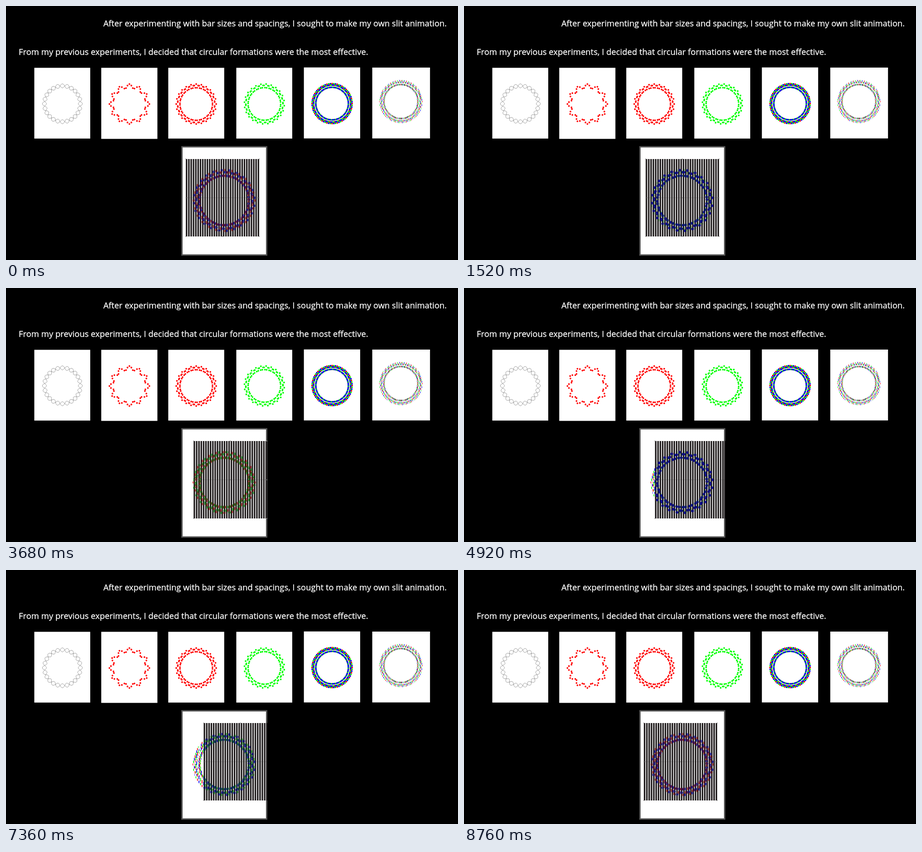
Animation, 998 px wide and 561 px high, one loop 8.8 s. Source, as an HTML page:

```html
<!DOCTYPE html>
<html lang="en">
<head>
<meta charset="utf-8">
<title>Slit animation</title>
<style>
  html, body { margin: 0; width: 100%; height: 100%; overflow: hidden; background: #000; }
  svg { display: block; width: 100vw; height: 100vh; }
  text { font-family: "Open Sans", "Noto Sans", sans-serif; fill: #fff; stroke: #fff; stroke-width: 0.3; }
</style>
</head>
<body>
<svg id="stage" viewBox="0 0 998 561">
  <text x="215" y="45.3" font-size="18.37">After experimenting with bar sizes and spacings, I sought to make my own slit animation.</text>
  <text x="28" y="107.5" font-size="18.44">From my previous experiments, I decided that circular formations were the most effective.</text>
</svg>
<script>
const NS = 'http://www.w3.org/2000/svg';
const stage = document.getElementById('stage');

function add(parent, tag, attrs) {
  const el = document.createElementNS(NS, tag);
  for (const key in attrs) el.setAttribute(key, attrs[key]);
  return parent.appendChild(el);
}

const rect = (parent, x, y, width, height, fill) =>
  add(parent, 'rect', { x, y, width, height, fill });

const place = (x, y, scale = 1) =>
  add(stage, 'g', { transform: `translate(${x} ${y}) scale(${scale})` });

// Wavy ring: twelve lobes around a circle
const LOBES = 12, RADIUS = 39.6, SWING = 4.5, DOTS = 60;
const DEGREE = Math.PI / 180;

// A point of the wave after the whole ring is turned
function wavePoint(angle, turn) {
  const r = RADIUS + SWING * Math.cos(LOBES * angle);
  const a = angle + turn;
  return `${(r * Math.sin(a)).toFixed(2)} ${(-r * Math.cos(a)).toFixed(2)}`;
}

function wavePath(turn) {
  const points = [];
  for (let i = 0; i < 360; i++) points.push(wavePoint(i * DEGREE, turn));
  return `M${points.join('L')}Z`;
}

function dotPath(turn) {
  let d = '';
  for (let i = 0; i < DOTS; i++) d += `M${wavePoint(i * 2 * Math.PI / DOTS, turn)}h0`;
  return d;
}

const dots = (parent, d, stroke) => add(parent, 'path', {
  d, stroke, fill: 'none', 'stroke-width': 3.8, 'stroke-linecap': 'round'
});

const HALF_LOBE = Math.PI / LOBES;
const doubleRing = turn => dotPath(turn) + dotPath(turn + HALF_LOBE);

const RED = { color: '#f00', dim: '#801410', d: doubleRing(0) };
const GREEN = { color: '#0f0', dim: '#006c12', d: doubleRing(5 * DEGREE) };
const BLUE = { color: '#00f', dim: '#000092', d: doubleRing(10 * DEGREE) };
const inks = [BLUE, RED, GREEN];

// Slit geometry, in stage pixels on the large sheet
const GRID = { y: 338, width: 162, height: 171 };
const SLITS = 31;
const PITCH = GRID.width / (SLITS + 2 / 3), SLIT = PITCH / 3, BAR = PITCH - SLIT;
const RING = { x: 481.8, y: 429.5, scale: 1.52 };
const STRIP_X = 415;

const defs = add(stage, 'defs', {});
inks.forEach((ink, n) => {
  const clip = add(defs, 'clipPath', { id: `strip${n}` });
  const width = SLIT / RING.scale;
  let d = '';
  for (let k = -2; k < 30; k++) {
    const x = (STRIP_X + k * PITCH - RING.x) / RING.scale + n * width;
    d += `M${x.toFixed(3)} -50h${width}v100h${-width}z`;
  }
  add(clip, 'path', { d });
});

function slicedRing(parent) {
  inks.forEach((ink, n) => {
    const layer = add(parent, 'g', { 'clip-path': `url(#strip${n})` });
    dots(layer, ink.d, ink.color);
  });
}

// Row of six sheets
rect(stage, 62.5, 136.5, 123.5, 156.3, '#fff');
rect(stage, 210.3, 136.5, 124, 157, '#fff');
rect(stage, 358.3, 136.5, 123.5, 156.3, '#fff');
rect(stage, 508.5, 136.5, 123.5, 156.3, '#fff');
rect(stage, 657.7, 135.7, 124.3, 156.8, '#fff');
rect(stage, 808.7, 136, 127.5, 156.5, '#fff');

const outline = place(124.5, 216);
for (const turn of [0, HALF_LOBE]) {
  add(outline, 'path', { d: wavePath(turn), fill: 'none', stroke: '#555', 'stroke-width': 0.6 });
}
dots(place(272.5, 216.5), dotPath(0), RED.color);
dots(place(420, 216.5), RED.d, RED.color);
dots(place(570.5, 216.3), GREEN.d, GREEN.color);
const mixed = place(720, 215.5);
for (const ink of [RED, GREEN, BLUE]) dots(mixed, ink.d, ink.color);
slicedRing(place(872, 211, 1.045));

// Large sheet with the moving grid
rect(stage, 387, 309.5, 190, 242, '#555');
rect(stage, 390, 312.5, 184, 236, '#fff');
slicedRing(place(RING.x, RING.y, RING.scale));

const sheetClip = add(defs, 'clipPath', { id: 'sheet' });
rect(sheetClip, 387, 309, 190, 243);
const gridClip = add(defs, 'clipPath', { id: 'gridArea' });
const gridArea = rect(gridClip, 0, GRID.y, GRID.width, GRID.height);

const sheet = add(stage, 'g', { 'clip-path': 'url(#sheet)' });
const grid = add(sheet, 'g', {});
for (let i = 0; i <= SLITS; i++) {
  rect(grid, i * PITCH, GRID.y, BAR, GRID.height, '#231f20');
}

// Ink that glows faintly through the bars
const glow = add(sheet, 'g', { 'clip-path': 'url(#gridArea)' });
const glowRing = add(glow, 'g', {
  transform: `translate(${RING.x} ${RING.y}) scale(${RING.scale})`
});
const glows = inks.map(ink => dots(glowRing, ink.d, ink.dim));

// Selection handles
const marks = add(sheet, 'g', {});
const midY = GRID.y + GRID.height / 2;
add(marks, 'path', { d: `M0 ${midY}h${GRID.width}`, stroke: '#222', 'stroke-width': 0.7, opacity: 0.3 });
for (const u of [0, 0.5, 1]) {
  for (const v of [0, 0.5, 1]) {
    rect(marks, u * GRID.width - 1, GRID.y + v * GRID.height - 1, 2, 2, '#9a9a9a');
  }
}

const LOOP = 8800, RESET = 8720, STEP = 40;
const START_X = 397, DELAY = 842, SPEED = 0.00605;

function draw(ms) {
  const t = Math.floor((ms % LOOP) / STEP) * STEP;
  const left = START_X + (t < RESET ? SPEED * Math.max(0, t - DELAY) : 0);
  const shift = `translate(${left.toFixed(3)} 0)`;
  grid.setAttribute('transform', shift);
  marks.setAttribute('transform', shift);
  gridArea.setAttribute('x', left);

  // Share of each ink seen through the slits
  const offset = (left + BAR - STRIP_X) / SLIT;
  const phase = ((offset % 3) + 3) % 3;
  glows.forEach((el, n) => {
    const gap = Math.abs(phase - n);
    const share = Math.max(0, 1 - Math.min(gap, 3 - gap));
    el.setAttribute('opacity', (0.65 * share).toFixed(3));
  });
}

const began = performance.now();
function tick() {
  draw(performance.now() - began);
  requestAnimationFrame(tick);
}
draw(0);
requestAnimationFrame(tick);
</script>
</body>
</html>
```
